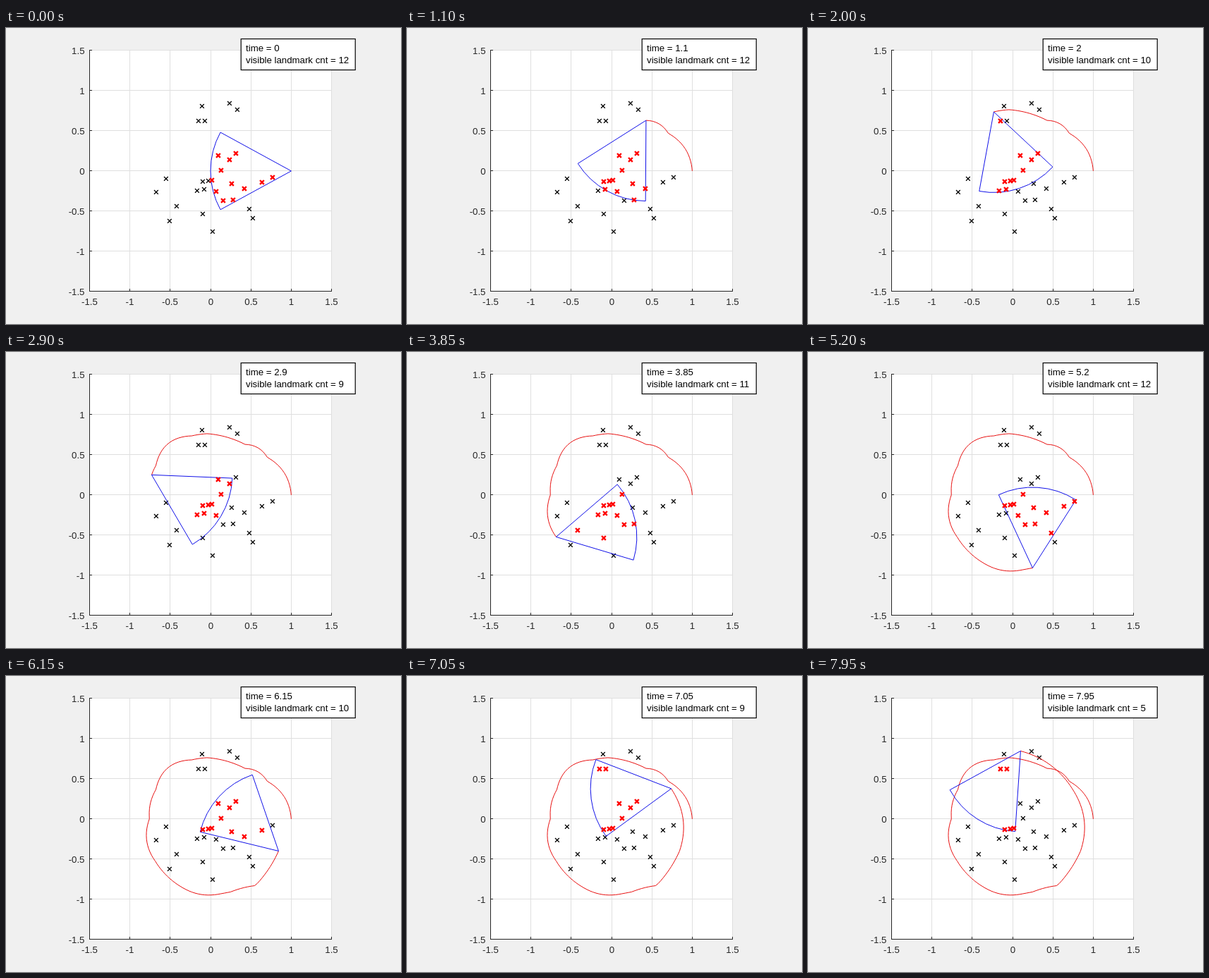
Animation, 560 px wide and 420 px high, one loop 8 s. Source, as an HTML page:

```html
<!DOCTYPE html>
<html lang="en">
<head>
<meta charset="utf-8">
<title>Landmark visibility</title>
<style>
  html, body { margin: 0; width: 100%; height: 100%; overflow: hidden; background: #f0f0f0; }
  svg { display: block; width: 560px; height: 420px; font: 13.25px "Liberation Sans", Arial, sans-serif; }
  path { fill: none; }
</style>
</head>
<body>
<svg viewBox="0 0 560 420">
  <rect width="560" height="420" fill="#f0f0f0"/>
  <rect x="118" y="31" width="344" height="343" fill="#fff"/>
  <path id="grid" stroke="#dfdfdf"/>
  <path id="axes" stroke="#262626"/>
  <g id="labels" fill="#262626"></g>
  <g transform="translate(.4 .4)">
    <path id="hidden" stroke="#000" stroke-width="1.25"/>
    <path id="trail" stroke="#e81010" stroke-linejoin="round"/>
    <path id="sector" stroke="#1010e8" stroke-linejoin="round"/>
    <path id="seen" stroke="#f00" stroke-width="2.4"/>
  </g>
  <rect x="333.2" y="15.5" width="162" height="44" fill="#fff" stroke="#000" stroke-width="1.2"/>
  <text id="time" x="340" y="33"></text>
  <text id="count" x="340" y="50"></text>
</svg>
<script>
const $ = id => document.getElementById(id);
const STEP = 50, FRAMES = 160;
const RANGE = 114.4, HALF = 0.5;
const rad = deg => deg * Math.PI / 180;

const landmarks = [
  [277.5, 110.5], [272.5, 131.5], [281.5, 131.5], [316.5, 106.5], [327.5, 115.5],
  [226.5, 213.5], [212.5, 232.5], [241.5, 252.5], [231.5, 273.5], [270.5, 230.5],
  [280.5, 228.5], [278.5, 217.5], [286.5, 216.5], [278.5, 263.5], [292.5, 288.5],
  [344.5, 256.5], [349.5, 269.5], [300.5, 180.5], [325.5, 177.5], [316.5, 186.5],
  [304.5, 201.5], [291.5, 215.5], [319.5, 220.5], [297.5, 231.5], [307.5, 244.5],
  [321.5, 243.5], [337.5, 227.5], [362.5, 218.5], [377.5, 211.5]
];

// The robot drives bowed curves between corners: x, y, outward bulge.
const legs = [
  { end: 22, turn: 241, bows: [[370, 149, 8.5], [338.5, 130.7, 5]] },
  { end: 40, turn: 288.25, bows: [[285, 115.5, 2.8], [263, 118.6, 0.5]] },
  { end: 77, turn: 372, bows: [[212, 161, 13], [203, 202, 3.4], [211, 262, 8]] },
  { end: 104, turn: 446.2, bows: [[250, 300, 3.5], [302, 309, 5], [318, 306, 0]] },
  { end: 123, turn: 497.6, bows: [[353, 297, -1.2], [386, 248, 2.6]] },
  { end: 159, turn: 597.5, bows: [[377, 164, 9.8], [301, 106, 9.8]] }
];

function bow([ax, ay], [bx, by, bulge], u) {
  const lift = 4 * u * (1 - u) * bulge / Math.hypot(bx - ax, by - ay);
  return [ax + u * (bx - ax) - lift * (by - ay), ay + u * (by - ay) + lift * (bx - ax)];
}

// Places along a polyline at equal distances.
function walk(line, count) {
  const far = [0];
  for (let i = 1; i < line.length; i++)
    far.push(far[i - 1] + Math.hypot(line[i][0] - line[i - 1][0], line[i][1] - line[i - 1][1]));
  const out = [];
  for (let n = 1, i = 1; n <= count; n++) {
    const goal = far[far.length - 1] * n / count;
    while (i < line.length - 1 && far[i] < goal) i++;
    const u = (goal - far[i - 1]) / (far[i] - far[i - 1]);
    out.push([0, 1].map(k => line[i - 1][k] + u * (line[i][k] - line[i - 1][k])));
  }
  return out;
}

const poses = [[404, 202.5, Math.PI]];
let from = poses[0], step = 0, heading = 180;
for (const { end, turn, bows } of legs) {
  const line = [from], count = end - step;
  for (const to of bows) {
    for (let k = 1; k <= 30; k++) line.push(bow(from, to, k / 30));
    from = to;
  }
  walk(line, count).forEach(([x, y], i) =>
    poses.push([x, y, rad(heading + (turn - heading) * (i + 1) / count)]));
  step = end;
  heading = turn;
}

function drawAxes() {
  let grid = "", ticks = "M118.5 31V373.5H462", text = "";
  for (let i = 0; i <= 6; i++) {
    const x = Math.round(118 + i * 57.17) + 0.5, y = 31.5 + 57 * i;
    const label = i / 2 - 1.5;
    grid += `M${x} 31V373M118 ${y}H462`;
    ticks += `M${x} 373v-3M118 ${y}h4`;
    text += `<text x="${x}" y="393" text-anchor="middle">${label}</text>` +
      `<text x="111.5" y="${y + 5.5}" text-anchor="end">${label ? -label : 0}</text>`;
  }
  $("grid").setAttribute("d", grid);
  $("axes").setAttribute("d", ticks);
  $("labels").innerHTML = text;
}

const cross = ([x, y], r) =>
  `M${x - r} ${y - r}L${x + r} ${y + r}M${x - r} ${y + r}L${x + r} ${y - r}`;

function visible([lx, ly], [x, y, dir]) {
  const dx = lx - x, dy = y - ly;
  return Math.hypot(dx, dy) <= RANGE && Math.cos(Math.atan2(dy, dx) - dir) >= Math.cos(HALF);
}

function draw(n) {
  const pose = poses[n], [x, y, dir] = pose;
  const tip = a => `${x + RANGE * Math.cos(a)} ${y - RANGE * Math.sin(a)}`;
  $("sector").setAttribute("d",
    `M${x} ${y}L${tip(dir - HALF)}A${RANGE} ${RANGE} 0 0 0 ${tip(dir + HALF)}Z`);
  $("trail").setAttribute("d", "M" + poses.slice(0, n + 1).map(p => p[0] + " " + p[1]).join("L"));
  const seen = landmarks.filter(mark => visible(mark, pose));
  const hidden = landmarks.filter(mark => !visible(mark, pose));
  $("seen").setAttribute("d", seen.map(mark => cross(mark, 2.9)).join(""));
  $("hidden").setAttribute("d", hidden.map(mark => cross(mark, 2.9)).join(""));
  $("time").textContent = "time = " + n * STEP / 1000;
  $("count").textContent = "visible landmark cnt = " + seen.length;
}

drawAxes();
draw(0);
const begin = performance.now();
function tick() {
  draw(Math.floor((performance.now() - begin) / STEP) % FRAMES);
  requestAnimationFrame(tick);
}
requestAnimationFrame(tick);
</script>
</body>
</html>
```
